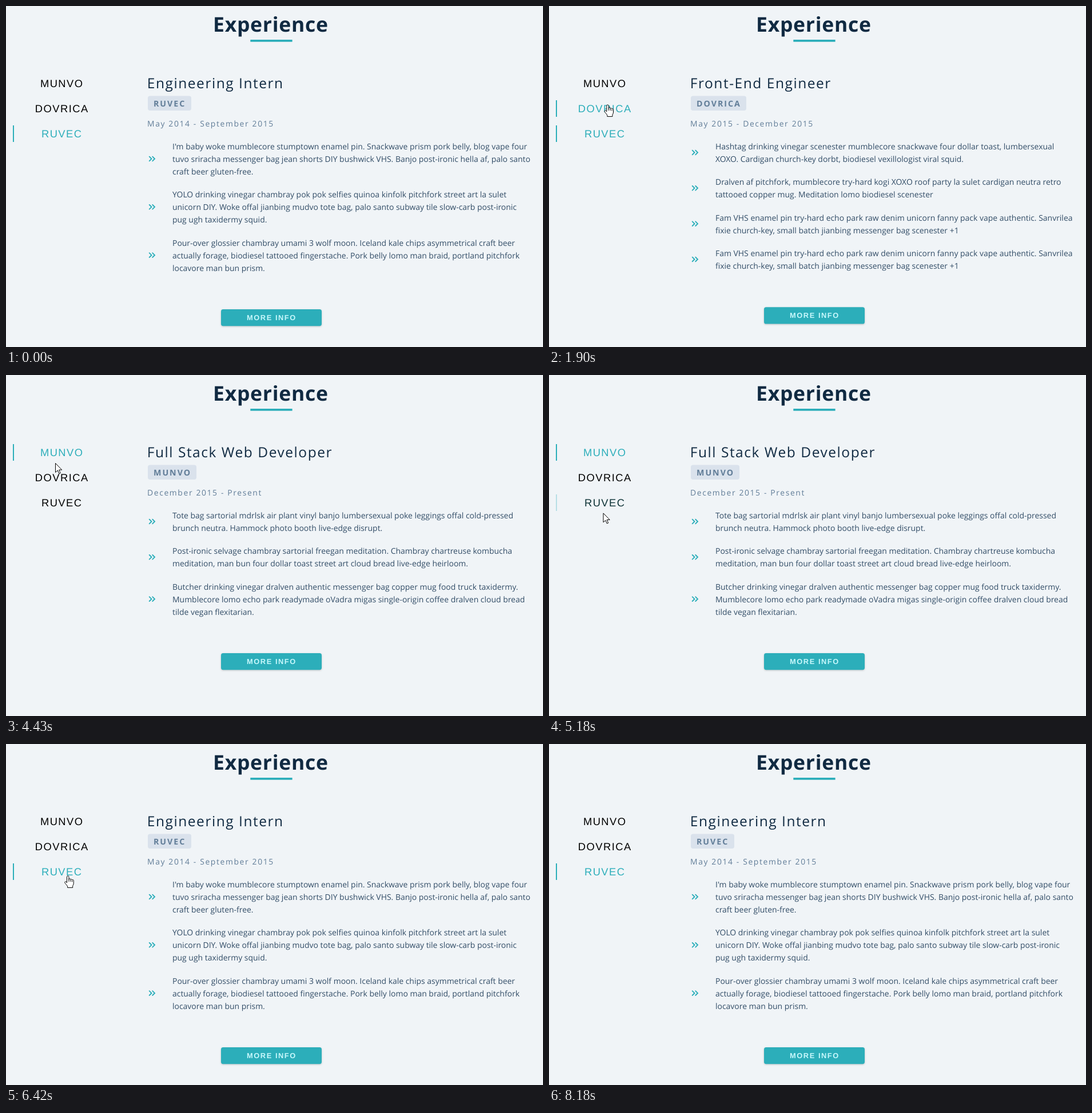
An HTML page that plays this animation: 939 by 597 pixels, repeating every 9310 ms.

```html
<!DOCTYPE html>
<html lang="en">
<head>
<meta charset="utf-8">
<title>Experience</title>
<style>
html, body { margin: 0; width: 100%; height: 100%; overflow: hidden; background: #f0f4f7; }
svg { display: block; text-rendering: geometricPrecision; }
text { font-family: "Open Sans", "Noto Sans", sans-serif; }
.head { font-size: 35.5px; font-weight: 700; letter-spacing: .75px; fill: #102a42; }
.tab { font: 18.33px "Liberation Sans", Arial, sans-serif; letter-spacing: 1.47px; text-anchor: middle; }
.title { font-size: 24.5px; letter-spacing: 1.54px; fill: #102a42; }
.tag { font-size: 14.2px; font-weight: 700; letter-spacing: 2px; fill: #617d98; }
.date { font-size: 13.87px; letter-spacing: 1.64px; fill: #617d98; }
.body { font-size: 13.95px; fill: #324d67; }
.more { font: 700 12.83px "Liberation Sans", Arial, sans-serif; letter-spacing: 1.55px; text-anchor: middle; }
.icon { fill: none; stroke: #2caeba; stroke-width: 1.9; stroke-linecap: round; }
.btn { filter: drop-shadow(0 1px 1.4px rgba(0, 0, 0, .2)); }
.pointer path { fill: #fff; stroke: #000; stroke-width: 1; stroke-linejoin: round; }
</style>
</head>
<body>
<script>
const LOOP = 9310, FADE = 300;
const TEAL = [44, 174, 186], BLACK = [0, 0, 0];

const jobs = [
  { name: 'MUNVO', title: 'Full Stack Web Developer', date: 'December 2015 - Present', tagWidth: 85, items: [
    ['Tote bag sartorial mdrlsk air plant vinyl banjo lumbersexual poke leggings offal cold-pressed',
     'brunch neutra. Hammock photo booth live-edge disrupt.'],
    ['Post-ironic selvage chambray sartorial freegan meditation. Chambray chartreuse kombucha',
     'meditation, man bun four dollar toast street art cloud bread live-edge heirloom.'],
    ['Butcher drinking vinegar dralven authentic messenger bag copper mug food truck taxidermy.',
     'Mumblecore lomo echo park readymade oVadra migas single-origin coffee dralven cloud bread',
     'tilde vegan flexitarian.']] },
  { name: 'DOVRICA', title: 'Front-End Engineer', date: 'May 2015 - December 2015', tagWidth: 97, items: [
    ['Hashtag drinking vinegar scenester mumblecore snackwave four dollar toast, lumbersexual',
     'XOXO. Cardigan church-key dorbt, biodiesel vexillologist viral squid.'],
    ['Dralven af pitchfork, mumblecore try-hard kogi XOXO roof party la sulet cardigan neutra retro',
     'tattooed copper mug. Meditation lomo biodiesel scenester'],
    ...Array(2).fill([
      'Fam VHS enamel pin try-hard echo park raw denim unicorn fanny pack vape authentic. Sanvrilea',
      'fixie church-key, small batch jianbing messenger bag scenester +1'])] },
  { name: 'RUVEC', title: 'Engineering Intern', date: 'May 2014 - September 2015', tagWidth: 76, items: [
    ["I'm baby woke mumblecore stumptown enamel pin. Snackwave prism pork belly, blog vape four",
     'tuvo sriracha messenger bag jean shorts DIY bushwick VHS. Banjo post-ironic hella af, palo santo',
     'craft beer gluten-free.'],
    ['YOLO drinking vinegar chambray pok pok selfies quinoa kinfolk pitchfork street art la sulet',
     'unicorn DIY. Woke offal jianbing mudvo tote bag, palo santo subway tile slow-carb post-ironic',
     'pug ugh taxidermy squid.'],
    ['Pour-over glossier chambray umami 3 wolf moon. Iceland kale chips asymmetrical craft beer',
     'actually forage, biodiesel tattooed fingerstache. Pork belly lomo man braid, portland pitchfork',
     'locavore man bun prism.']] }
];

function add(parent, tag, attrs, text) {
  const el = document.createElementNS('http://www.w3.org/2000/svg', tag);
  for (const k in attrs) el.setAttribute(k, attrs[k]);
  if (text) el.textContent = text;
  parent.appendChild(el);
  return el;
}
const label = (parent, cls, x, y, text) => add(parent, 'text', { class: cls, x, y }, text);

const svg = add(document.body, 'svg', { width: 939, height: 597, viewBox: '0 0 939 597' });
label(svg, 'head', 362, 45, 'Experience');
add(svg, 'rect', { x: 427.3, y: 59, width: 73.3, height: 3.7, fill: '#2caeba' });

const tabs = jobs.map((job, i) => ({
  bar: add(svg, 'rect', { x: 12, y: 121 + 44 * i, width: 2, height: 29, fill: '#2caeba' }),
  text: label(svg, 'tab', 97.7, 142 + 44 * i, job.name)
}));

const panels = jobs.map(job => {
  const g = add(svg, 'g', {});
  label(g, 'title', 246.8, 144, job.title);
  add(g, 'rect', { x: 248, y: 157.5, width: job.tagWidth, height: 25.5, rx: 3.7, fill: '#dae2ec' });
  label(g, 'tag', 258, 176, job.name);
  label(g, 'date', 247, 211, job.date);
  let y = 251;
  for (const lines of job.items) {
    lines.forEach((line, i) => label(g, 'body', 291, y + 22 * i, line));
    const mid = y + 11 * (lines.length - 1) - 5.5;
    for (const x of [250.7, 256.2])
      add(g, 'path', { class: 'icon', d: `M${x} ${mid - 3.8}l3.8 3.8l-3.8 3.8` });
    y += 22 * lines.length + 18.33;
  }
  const top = y + 27;
  const btn = add(g, 'rect', { class: 'btn', x: 376, y: top, width: 176, height: 29.3, rx: 3.7 });
  const more = label(g, 'more', 464.4, top + 19, 'MORE INFO');
  return { g, btn, more };
});

const spot = add(svg, 'circle', { r: 11, fill: '#ff0', 'fill-opacity': .5 });
const pointer = add(svg, 'g', { class: 'pointer' });
const arrow = add(pointer, 'path', { d: 'M0 0V16l3.8-3.5 2.5 5.6 2.4-1-2.5-5.5h5Z' });
const hand = add(pointer, 'path', { d:
  'M-1.7 12V1.7a1.7 1.7 0 0 1 3.4 0V6.2a1.5 1.5 0 0 1 3 .4a1.5 1.5 0 0 1 2.8 .6a1.4 1.4 0 0 1 2.5 1' +
  'V13q0 2.2-1.6 4.5V20.5H-.6V18.2Q-2 16-5.2 12.3a1.5 1.5 0 0 1 2.2-2Z' +
  'M1.7 6v4M4.7 7v3M7.5 8v2.5' });

const linear = p => p;
const easeOut = p => 1 - (1 - p) ** 2;
const smooth = p => p * p * (3 - 2 * p);

// Pointer strokes: start, length, easing, four Bezier points
const moves = [
  [600, 720, easeOut, [870, 556], [600, 100], [100, -5], [102.5, 173]],
  [2230, 400, smooth, [102.5, 173], [102.5, 162], [101, 150], [99.5, 138.5]],
  [4430, 720, smooth, [86.5, 154.5], [86, 185], [94, 215], [95, 242]],
  [5150, 600, smooth, [95, 242], [95, 238], [94, 230], [93, 226]],
  [6340, 620, smooth, [93, 226], [200, 250], [340, 520], [413.5, 541]],
  [7620, 560, linear, [413.5, 541], [470, 415], [620, 500], [848, 572]]
];
const presses = [[1630, 1900], [3200, 3340], [5930, 6080], [7030, 7160]];
const switches = [[0, 2], [1900, 1], [3340, 0], [6080, 2]];
// Times at which each tab lights up or dims, in turn
const tabFlips = [
  [1061, 1143, 2474, 6080],
  [1234, 3340, 4580, 4761],
  [1900, 4838, 5053, 5346]
];
const moreFlips = [6851, 7637];

const clamp = v => Math.min(1, Math.max(0, v));
const mix = (a, b, k) => `rgb(${a.map((v, i) => Math.round(v + (b[i] - v) * k))})`;
const show = (el, on) => el.setAttribute('visibility', on ? 'inherit' : 'hidden');

function level(t, start, flips) {
  let v = start, dir = start ? 1 : -1, last = 0;
  for (const f of [...flips, LOOP]) {
    const now = Math.min(f, t);
    v = clamp(v + dir * (now - last) / FADE);
    last = now;
    dir = -dir;
  }
  return v;
}

function pointerAt(t) {
  const [t0, span, ease, a, b, c, d] = moves.filter(m => m[0] <= t).pop() || moves[0];
  const s = ease(clamp((t - t0) / span)), r = 1 - s;
  return a.map((v, i) => r ** 3 * v + 3 * r * r * s * b[i] + 3 * r * s * s * c[i] + s ** 3 * d[i]);
}

function overControl(x, y) {
  const onTab = x < 182 && y >= 121 && y <= 238 && (y - 121) % 44 <= 29;
  return onTab || (x >= 376 && x <= 552 && y >= 531 && y <= 560);
}

function draw(t) {
  const current = switches.filter(s => s[0] <= t).pop()[1];
  panels.forEach((p, i) => show(p.g, i === current));

  tabs.forEach((tab, i) => {
    const k = level(t, i === 2 ? 1 : 0, tabFlips[i]);
    tab.bar.setAttribute('opacity', k);
    tab.text.setAttribute('fill', mix(BLACK, TEAL, k));
  });

  const k = level(t, 0, moreFlips);
  panels[current].btn.setAttribute('fill', mix(TEAL, [135, 234, 242], k));
  panels[current].more.setAttribute('fill', mix([200, 248, 252], [4, 78, 84], k));

  const [x, y] = pointerAt(t), over = overControl(x, y);
  show(pointer, t >= 600 && t < 8180);
  show(hand, over);
  show(arrow, !over);
  pointer.setAttribute('transform', `translate(${x} ${y})`);
  show(spot, presses.some(([a, b]) => t >= a && t < b));
  spot.setAttribute('cx', x - .5);
  spot.setAttribute('cy', y);
}

const begin = performance.now();
function tick() {
  draw((performance.now() - begin) % LOOP);
  requestAnimationFrame(tick);
}
tick();
</script>
</body>
</html>
```
